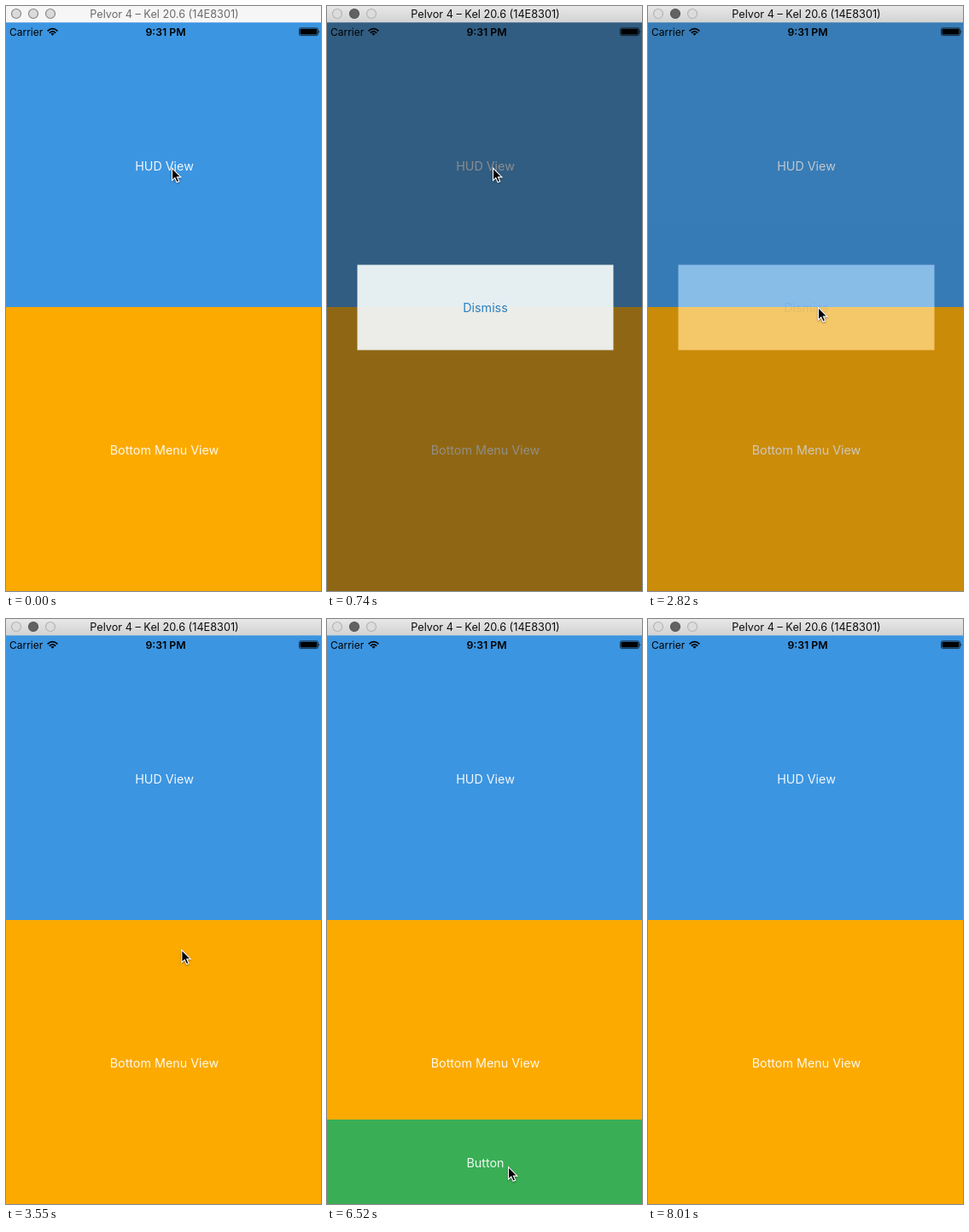
An HTML page for the animation above (8560 ms loop, 369 by 686 pixels).

```html
<!DOCTYPE html>
<html lang="en">
<head>
<meta charset="utf-8">
<title>HUD demo</title>
<style>
  html, body { margin: 0; width: 100%; height: 100%; overflow: hidden; }
  svg { display: block; font: 14.3px Inter, "Open Sans", sans-serif; text-anchor: middle; }
  .label { fill: #fff; fill-opacity: .92; }
  .bar { fill: url(#inactive); }
  .title { font-size: 12.7px; fill: #6a6a6a; }
  .light { fill: #dadada; stroke: #878787; stroke-width: 1.2; }
  .active .bar { fill: url(#chrome); }
  .active .title { fill: #0c0c0c; }
  .active .light { fill: #dcdcdc; stroke: #b4b4b4; }
  .active .mid { fill: #626262; stroke: #585858; }
  .status { font-size: 12px; }
  #cursor { filter: drop-shadow(0 1px 1px #0006); }
</style>
</head>
<body>
<svg width="369" height="686" viewBox="0 0 369 686">
  <defs>
    <linearGradient id="inactive"><stop stop-color="#f6f6f6"/></linearGradient>
    <linearGradient id="chrome" x2="0" y2="1">
      <stop stop-color="#e8e8e8"/><stop offset="1" stop-color="#d2d2d2"/>
    </linearGradient>
  </defs>

  <rect y="19" width="369" height="334" fill="#3c95e1"/>
  <rect y="353" width="369" height="333" fill="#fcaa00"/>
  <text class="label" x="185.5" y="192.5">HUD View</text>
  <text class="label" id="menu" x="185.5" y="526">Bottom Menu View</text>

  <g id="panel">
    <rect y="587" width="369" height="99" fill="#3aae55"/>
    <text class="label" id="button" x="185.5" y="642.5">Button</text>
  </g>

  <g id="modal">
    <rect y="19" width="369" height="667" fill="#282828" fill-opacity=".51"/>
    <rect x="35.5" y="303.5" width="300" height="50" fill="#e5eef1"/>
    <rect x="35.5" y="353" width="300" height="50.5" fill="#ecece8"/>
    <text id="dismiss" x="185.5" y="359" fill="#2c80c0">Dismiss</text>
  </g>

  <g class="status">
    <text x="4" y="34.5" text-anchor="start">Carrier</text>
    <g fill="none" stroke="#000" stroke-width="1.7">
      <path d="M48.6 29.3Q54.5 23.9 60.4 29.3M50.8 31.6Q54.5 28.2 58.2 31.6"/>
      <path d="M52.4 32.6Q54.5 30.9 56.6 32.6L54.5 34.8Z" fill="#000" stroke="none"/>
    </g>
    <text x="187" y="34.5" font-size="12.3" font-weight="600">9:31 PM</text>
    <rect x="343.5" y="25.8" width="22" height="8.8" rx="1.8" fill="none" stroke="#000" stroke-opacity=".65"/>
    <rect x="344.5" y="26.8" width="20" height="6.8" rx="1"/>
    <path d="M366.5 28.5q1.7 1.7 0 3.4z"/>
  </g>

  <g id="window">
    <rect class="bar" width="369" height="19.3"/>
    <circle class="light" cx="12" cy="9" r="5.5"/>
    <circle class="light mid" cx="32" cy="9" r="5.5"/>
    <circle class="light" cx="52" cy="9" r="5.5"/>
    <text class="title" x="185.5" y="14">Pelvor 4 – Kel 20.6 (14E8301)</text>
  </g>

  <path id="cursor" d="M0 0V14.6L3.3 11.5L5.6 16.7L8.2 15.6L5.9 10.6H10.4Z" stroke="#fff" stroke-width="1.1"/>
</svg>
<script>
const LOOP = 8560;
const $ = id => document.getElementById(id);
const fade = (id, v) => $(id).setAttribute("opacity", v);

// Number of steps taken (0..n) when n even steps run from start to end.
const steps = (t, start, end, n) =>
  Math.max(0, Math.min(n, Math.floor((t - start + 6) * (n - 1) / (end - start)) + 1));

const smooth = p => p * p * (3 - 2 * p);
const easeOut = p => Math.sin(p * Math.PI / 2);

// Point between a and b, with a sideways bow.
const along = (a, b, p, bow = 0) => [
  a[0] + (b[0] - a[0]) * p + bow * Math.sin(Math.PI * p),
  a[1] + (b[1] - a[1]) * p
];

const HUD = [194.5, 190], DISMISS = [199.5, 353.5], MENU = [205.5, 531],
      BUTTON = [212.5, 642.5], AWAY = [291, 704];

function pointer(t) {
  if (t < 3540) return along(HUD, DISMISS, smooth(Math.min(1, steps(t, 1780, 2820, 8) / 6)));
  if (t < 5920) return along(DISMISS, MENU, easeOut(steps(t, 3550, 4580, 8) / 8), 9);
  if (t < 7710) return along(MENU, BUTTON, easeOut(steps(t, 5930, 6520, 5) / 5), 7);
  return along(BUTTON, AWAY, steps(t, 7720, 8010, 3) / 3);
}

function draw(now) {
  const t = now % LOOP;
  const shown = steps(t, 450, 740, 3), closing = steps(t, 2670, 2960, 3);
  const opened = steps(t, 5030, 5330, 3), hiding = steps(t, 6970, 7120, 2);

  $("window").setAttribute("class", shown ? "active" : "");
  fade("modal", [0, .15, .65, 1][shown] * [1, .98, .45, 0][closing]);
  fade("dismiss", closing ? .2 : 1);
  fade("menu", [1, .5, .8, 1][opened]);
  fade("panel", [0, .75, .96, 1][opened] * [1, .4, 0][hiding]);
  fade("button", hiding ? .5 : 1);
  $("cursor").setAttribute("transform", `translate(${pointer(t)})`);
  requestAnimationFrame(() => draw(performance.now() - begin));
}

const begin = performance.now();
draw(0);
</script>
</body>
</html>
```
